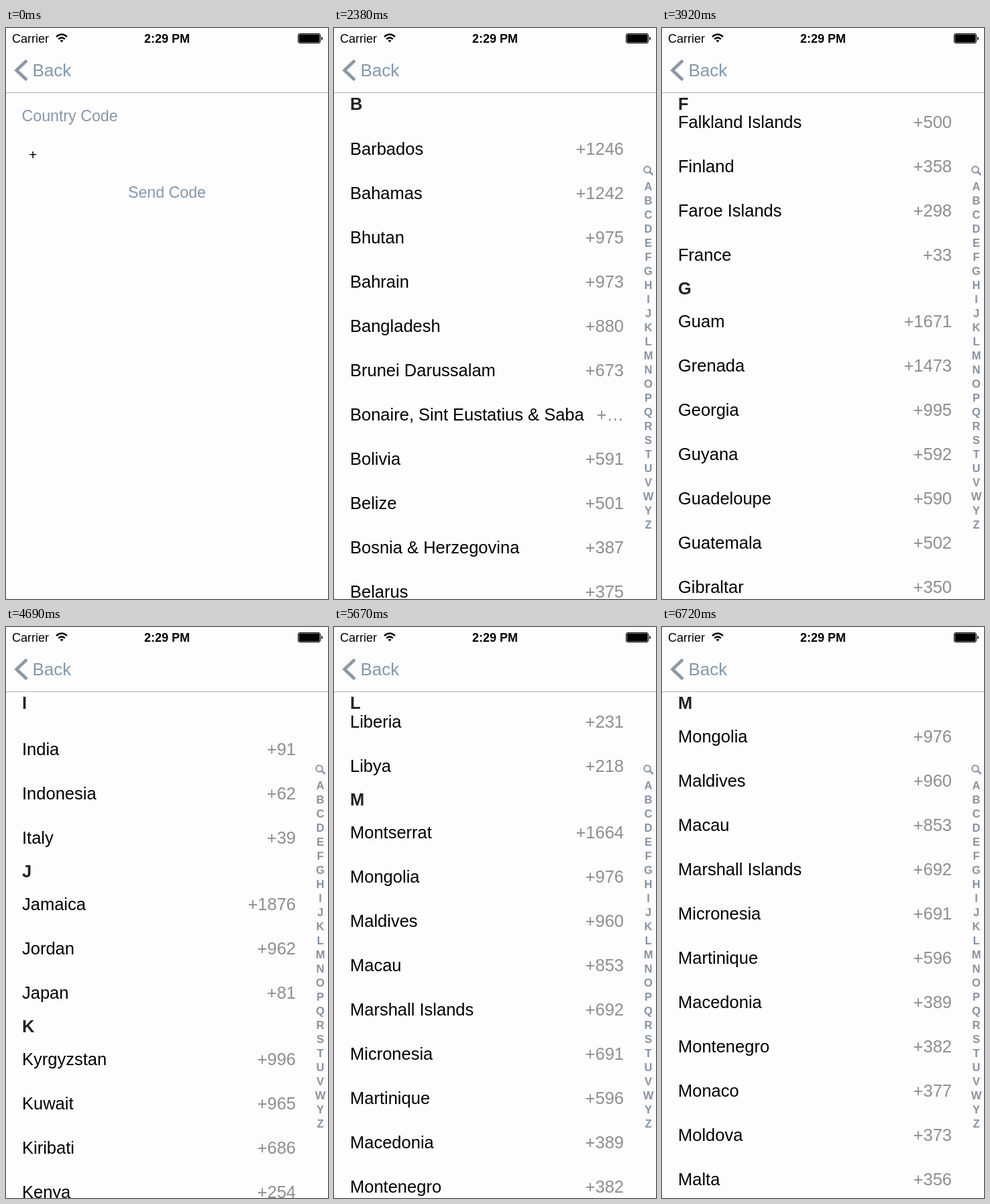
Write an HTML page that moves like this. It is 480 px wide and 851 px high and loops after 8000 ms.

```html
<!DOCTYPE html>
<html lang="en">
<head>
<meta charset="utf-8">
<title>Country code picker</title>
<style>
  html, body { margin: 0; width: 100%; height: 100%; overflow: hidden; background: #fdfdfd; }
  body { font: 25.5px/66px "Liberation Sans", Arial, sans-serif; font-kerning: none; color: #000; }
  #stage { position: relative; width: 480px; height: 851px; overflow: hidden; background: #fdfdfd; }
  #stage svg { position: absolute; left: 0; top: 0; fill: none; }
  .at { position: absolute; line-height: 30px; white-space: pre; }
  .tint { color: #8398ad; }
  #bar { position: absolute; z-index: 3; left: 0; top: 0; width: 480px; height: 96px;
         background: #fdfdfd; border-bottom: 1px solid #b4b4b6; }
  .page { position: absolute; left: 0; top: 96px; width: 480px; height: 755px; background: #fdfdfd; }
  #list { width: 480px; height: 755px; overflow: hidden; overflow-anchor: none; }
  #search { position: relative; width: 457px; height: 65px; background: #c9c9ce; border-bottom: 1px solid #b6b6ba; }
  #field { position: absolute; left: 12px; top: 12px; width: 434px; height: 42px; border-radius: 7px; background: #fefefe; }
  #list h2 { position: sticky; z-index: 1; top: 0; margin: 0; padding-left: 24px; height: 33px;
             font: bold 25.5px/34px "Liberation Sans", Arial, sans-serif; color: #222; background: #fdfdfd; }
  .row { display: flex; justify-content: space-between; height: 66px; padding: 0 48px 0 24px; white-space: pre; }
  .row span { color: #8e8e93; }
  #index { position: absolute; z-index: 2; left: 0; top: 0; color: #8593a3; }
  #index b { position: absolute; left: 456px; width: 25px; text-align: center; font-size: 16.5px; line-height: 20px; }
</style>
</head>
<body>
<div id="stage">
  <div class="page" id="home">
    <div class="at tint" id="choose" style="left:23.5px;top:20px;font-size:23.2px">Country Code</div>
    <div class="at" style="left:34px;top:78px;font-size:21px">+</div>
    <div class="at tint" style="left:0;width:480px;top:134px;font-size:23.2px;text-align:center">Send Code</div>
  </div>

  <div class="page" id="picker">
    <div id="list">
      <div id="search">
        <div id="field"></div>
        <svg width="457" height="65" stroke="#8e8e93" stroke-width="1.7">
          <circle cx="187.5" cy="31" r="7"/><path d="M192.5 36L199 42.5"/>
        </svg>
        <div class="at" style="left:210px;top:18px;font-size:21px;color:#8e8e93">Search</div>
      </div>
    </div>
    <div id="index">
      <svg width="480" height="140" stroke="#8593a3" stroke-width="2">
        <circle cx="467" cy="115" r="4.8"/><path d="M470.5 118.5L475.5 123" stroke-width="2.6"/>
      </svg>
    </div>
  </div>

  <div id="bar">
    <div class="at" style="left:9px;top:1px;font-size:18px">Carrier</div>
    <div class="at" style="left:0;width:480px;top:1px;font-size:18px;font-weight:bold;text-align:center">2:29 PM</div>
    <div class="at tint" style="left:39.5px;top:48px;font-size:26px">Back</div>
    <svg width="480" height="96">
      <g stroke="#000" stroke-width="2.5">
        <path d="M75 13.2Q83 5.8 91 13.2M78.2 16.6Q83 12.2 87.8 16.6"/>
        <path d="M80.5 18.8Q83 16.6 85.5 18.8L83 21.5Z" fill="#000" stroke="none"/>
      </g>
      <rect x="435.5" y="8.5" width="33" height="14" rx="2.5" stroke="#000"/>
      <rect x="436.6" y="9.6" width="30.8" height="11.8" rx="1" fill="#000"/>
      <path d="M470 13Q472 13.5 472 15.5T470 18Z" fill="#000"/>
      <path d="M31 48.5L15.5 63L31 77.5" stroke="#8a98a6" stroke-width="4.6"/>
    </svg>
  </div>
</div>

<script>
const countries = `
American Samoa 1684,Antigua & Barbuda 1268,Anguilla 1264,Azerbaijan 994,Andorra 376,Armenia 374,Albania 355,Aruba 297,Angola 244,Algeria 213,Afghanistan 93,Australia 61,Argentina 54,Austria 43
Bermuda 1441,Barbados 1246,Bahamas 1242,Bhutan 975,Bahrain 973,Bangladesh 880,Brunei Darussalam 673,Bonaire, Sint Eustatius & Saba …,Bolivia 591,Belize 501,Bosnia & Herzegovina 387,Belarus 375,Bulgaria 359,Botswana 267,Burundi 257,Benin 229,Burkina Faso 226,Brazil 55,Belgium 32
Cayman Islands 1345,Cambodia 855,Cook Islands 682,Curaçao 599,Costa Rica 506,Czech Rep. 420,Croatia 385,Cyprus 357,Comoros 269,Congo (Dem. Rep.) 243,Congo (Rep.) 242,Cape Verde 238,Cameroon 237,Central African Rep. 236,Chad 235,Côte d\`Ivoire 225,China 86,Colombia 57,Chile 56,Cuba 53,Canada 1
Dominican Rep. 1809,Dominica 1767,Djibouti 253,Denmark 45
Ecuador 593,El Salvador 503,Estonia 372,Eritrea 291,Ethiopia 251,Equatorial Guinea 240,Egypt 20
French Polynesia 689,Fiji 679,French Guiana 594,Falkland Islands 500,Finland 358,Faroe Islands 298,France 33
Guam 1671,Grenada 1473,Georgia 995,Guyana 592,Guadeloupe 590,Guatemala 502,Gibraltar 350,Greenland 299,Guinea-Bissau 245,Gabon 241,Ghana 233,Guinea 224,Gambia 220,Germany 49,Greece 30
Hong Kong 852,Haiti 509,Honduras 504,Hungary 36
Israel 972,Iraq 964,Iceland 354,Ireland 353,Iran 98,India 91,Indonesia 62,Italy 39
Jamaica 1876,Jordan 962,Japan 81
Kyrgyzstan 996,Kuwait 965,Kiribati 686,Kenya 254,Kazakhstan 7
Lebanon 961,Laos 856,Liechtenstein 423,Latvia 371,Lithuania 370,Luxembourg 352,Lesotho 266,Liberia 231,Libya 218
Montserrat 1664,Mongolia 976,Maldives 960,Macau 853,Marshall Islands 692,Micronesia 691,Martinique 596,Macedonia 389,Montenegro 382,Monaco 377,Moldova 373,Malta 356,Madagascar 261`;

const $ = id => document.getElementById(id);
const add = (parent, tag, text = '', cls = '') => {
  const el = document.createElement(tag);
  el.textContent = text;
  if (cls) el.className = cls;
  return parent.appendChild(el);
};

for (const line of countries.trim().split('\n')) {
  const section = add($('list'), 'section');
  add(section, 'h2', line[0]);
  // Commas inside a name are followed by a space.
  for (const item of line.split(/,(?! )/)) {
    const cut = item.lastIndexOf(' ');
    const row = add(section, 'div', item.slice(0, cut), 'row');
    add(row, 'span', '+' + item.slice(cut + 1));
  }
}

[...'ABCDEFGHIJKLMNOPQRSTUVWYZ'].forEach((letter, i) => {
  add($('index'), 'b', letter).style.top = 129.5 + i * 21.03 + 'px';
});

const LOOP = 8000, TICK = 70;

// [tick, scroll offset, decay towards this point]; negative decay speeds up
const flick = [[0, 0, 0], [6, 1071, -0.6], [18, 3001, 0.01], [39, 6646, 0.01], [53, 7974, 1.96], [68, 8183, 2.2]];

const ticksSince = (t, start) => Math.max(0, Math.floor((t - start) / TICK));

function scrollAt(n) {
  for (let i = 1; i < flick.length; i++) {
    const [n0, s0] = flick[i - 1], [n1, s1, k] = flick[i];
    if (n <= n1) {
      const x = (n - n0) / (n1 - n0);
      return Math.round(s0 + (s1 - s0) * (1 - Math.exp(-k * x)) / (1 - Math.exp(-k)));
    }
  }
  return flick[flick.length - 1][1];
}

function draw() {
  const t = performance.now() % LOOP;
  const push = 1 - (1 - Math.min(1, ticksSince(t, 910) / 8)) ** 3;
  $('choose').style.opacity = t >= 840 && t < 980 ? 0.2 : 1;
  $('home').style.transform = `translateX(${-144 * push}px)`;
  $('picker').style.transform = `translateX(${480 * (1 - push)}px)`;
  $('list').scrollTop = scrollAt(ticksSince(t, 1960));
  requestAnimationFrame(draw);
}
draw();
</script>
</body>
</html>
```
